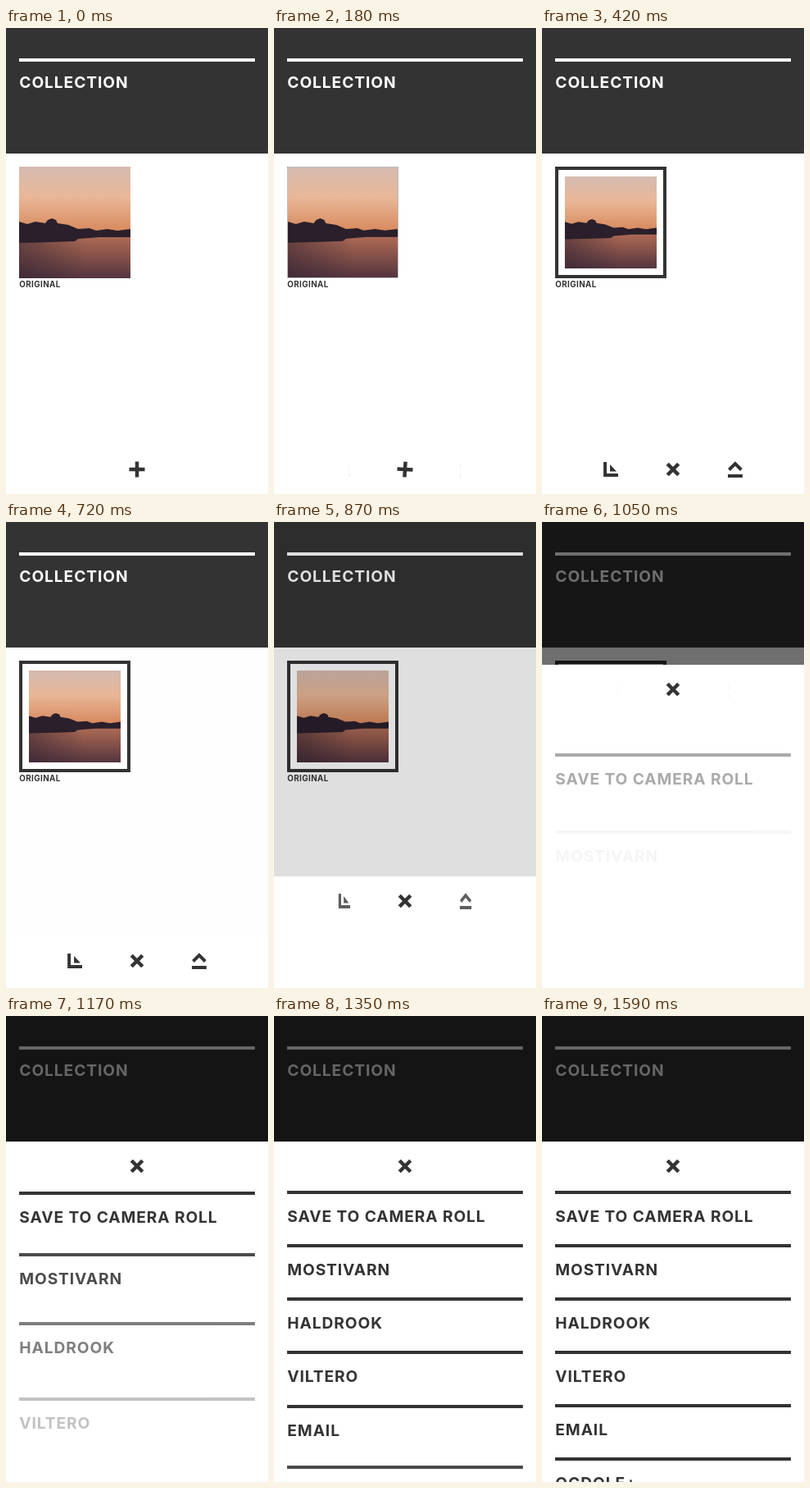
Write an HTML page that moves like this. It is 320 by 568 pixels and loops after 1.74 s.

```html
<!DOCTYPE html>
<html lang="en">
<head>
<meta charset="utf-8">
<title>Collection</title>
<style>
  html, body { margin: 0; height: 100%; overflow: hidden; background: #fff; }
  svg { display: block; width: 100vw; height: 100vh; }
  text { font: 700 19.2px Inter, sans-serif; letter-spacing: .9px; }
  .caption { font-size: 9.8px; letter-spacing: .4px; }
</style>
</head>
<body>
<svg viewBox="0 0 320 568" fill="#333">
  <defs>
    <linearGradient id="sky" x2="0" y2="1">
      <stop stop-color="#d5bbb0"/>
      <stop offset=".45" stop-color="#e9b797"/>
      <stop offset="1" stop-color="#d68659"/>
    </linearGradient>
    <linearGradient id="water" x2="0" y2="1">
      <stop stop-color="#b57058"/>
      <stop offset=".4" stop-color="#91584c"/>
      <stop offset="1" stop-color="#54353f"/>
    </linearGradient>
    <linearGradient id="shade">
      <stop stop-color="#2b2030" stop-opacity=".5"/>
      <stop offset=".6" stop-color="#2b2030" stop-opacity="0"/>
    </linearGradient>
  </defs>

  <rect width="320" height="568" fill="#fff"/>
  <rect width="320" height="153"/>
  <rect x="16" y="37" width="288" height="4" fill="#fff"/>
  <text x="16.3" y="73" fill="#fff">COLLECTION</text>
  <g id="photo">
    <rect x="-68" y="-68" width="136" height="82" fill="url(#sky)"/>
    <rect x="-68" y="12" width="136" height="56" fill="url(#water)"/>
    <rect x="-68" y="18" width="136" height="50" fill="url(#shade)"/>
    <path fill="#2a1f2b" d="M-68 -1 L-58 2 -48 -1 -36 1 -33 -3 -28 -5 -23 -3 -21 1 -8 3 4 8
      18 7 26 10 40 8 52 10 68 8 V18 L30 18 4 20 0 23 -30 24 -68 25Z"/>
  </g>
  <rect id="border" fill="none" stroke="#333"/>
  <text class="caption" x="16.3" y="316">ORIGINAL</text>
  <rect id="dim" width="320" height="568" fill="#000"/>

  <g id="sheet">
    <rect width="320" height="568" fill="#fff"/>
    <path id="cross" d="M-9.5 0H9.5M0 -9.5V9.5" stroke="#333" stroke-width="4.5"/>
    <path id="crop" d="M-18 21h4v14h14v4h-18zM-10 24l8 8.5h-8z"/>
    <g id="share">
      <path d="M1.5 30.5L9 23L16.5 30.5" fill="none" stroke="#333" stroke-width="4"/>
      <rect y="36" width="18" height="4"/>
    </g>
  </g>
  <g id="rows"></g>
</svg>
<script>
const LOOP = 1740;
const LABELS = ['SAVE TO CAMERA ROLL', 'MOSTIVARN', 'HALDROOK', 'VILTERO', 'EMAIL', 'OGDOLE+'];
const get = id => document.getElementById(id);
const set = (el, attrs) => {
  for (const name in attrs) el.setAttribute(name, attrs[name]);
};

get('rows').innerHTML = LABELS.map(label =>
  `<g><rect x="16" width="288" height="4"/><text x="16.3" y="38">${label}</text></g>`).join('');
const rows = [...get('rows').children];

const progress = (t, start, duration) => Math.min(1, Math.max(0, (t - start) / duration));
const quintInOut = x => x < .5 ? 16 * x ** 5 : 1 - 16 * (1 - x) ** 5;
const sineOut = x => Math.sin(x * Math.PI / 2);

function draw(t) {
  const select = quintInOut(progress(t, 0, 520));
  const open = quintInOut(progress(t, 568.5, 718));

  set(get('photo'), { transform: `translate(84 237) scale(${1 - select * 24 / 136})` });
  const size = 136 - 4 * select;
  set(get('border'), {
    x: 16 + 2 * select, y: 169 + 2 * select, width: size, height: size, 'stroke-width': 4 * select
  });
  set(get('dim'), { opacity: .6 * open });

  // The sheet and its rows move in whole pixels.
  const top = 508 - 355 * open;
  set(get('sheet'), { transform: `translate(0 ${Math.floor(top)})` });
  set(get('cross'), { transform: `translate(160 30) rotate(${45 * select})` });

  // Side icons unfold from their inner edges and fold back as the sheet opens.
  const fold = select * (1 - open);
  set(get('crop'), { transform: `translate(93 0) scale(${fold} 1)`, opacity: fold });
  set(get('share'), { transform: `translate(227 0) scale(${fold} 1)`, opacity: fold });

  rows.forEach((row, i) => {
    const shown = sineOut(progress(t, 1001 + 45 * i, 185));
    const y = Math.round(top + 60 + 65 * i + 80 * (1 - shown));
    set(row, { transform: `translate(0 ${y})`, opacity: shown });
  });
}

const begin = performance.now();
function tick() {
  draw((performance.now() - begin) % LOOP);
  requestAnimationFrame(tick);
}
tick();
</script>
</body>
</html>
```
